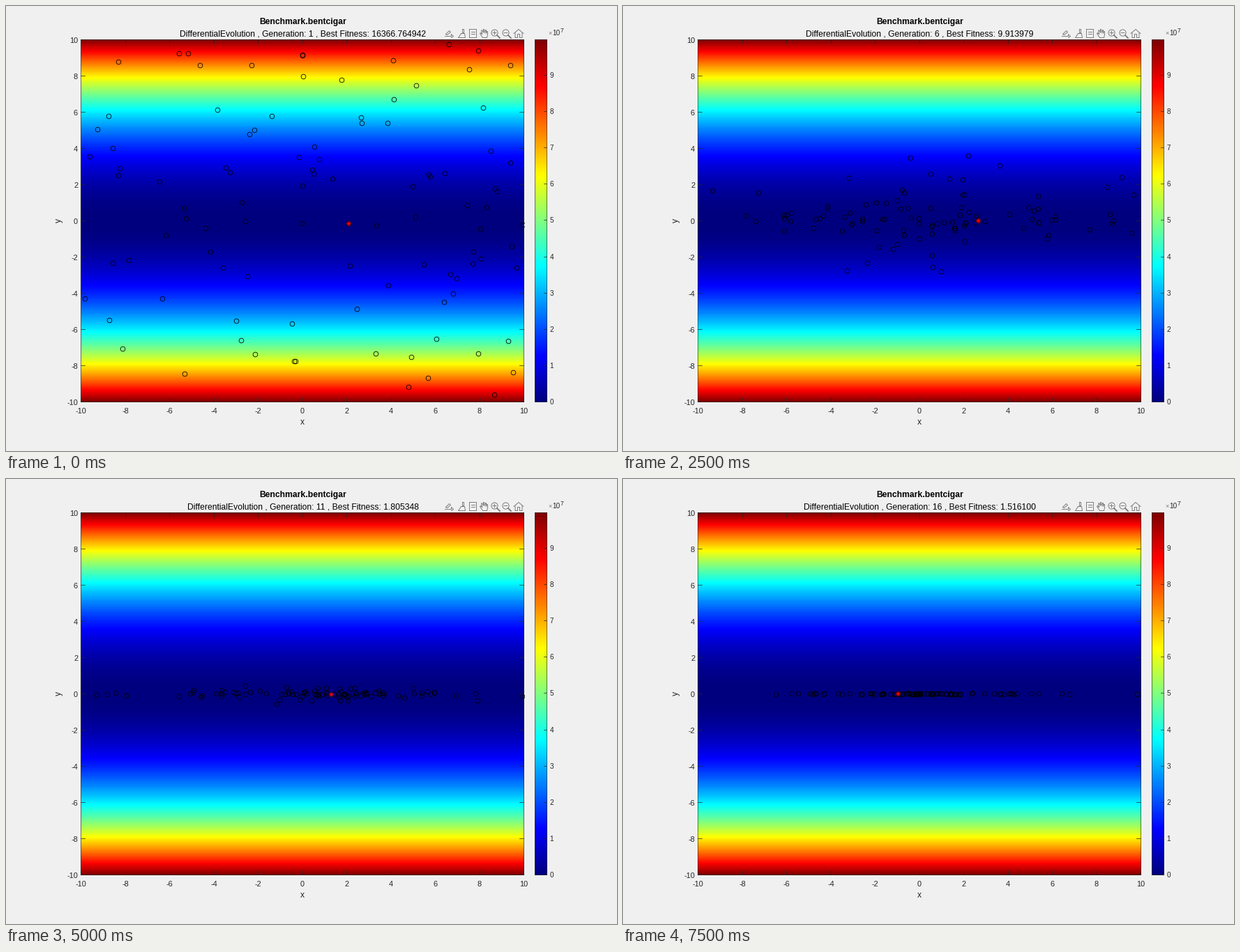
Animation of 876 by 639 pixels, one loop 8000 ms. Source, as a matplotlib script:

```python
import numpy as np
import matplotlib.pyplot as plt
from matplotlib.animation import FuncAnimation
from matplotlib.colors import ListedColormap
from matplotlib.patches import Circle, Rectangle

plt.rcParams["font.family"] = "Liberation Sans"

W, H, DPI = 876, 639, 96
PT = 72 / DPI  # points per pixel
GENS, STEP = 16, 500
LEFT, RIGHT, TOP, BOTTOM = 107.5, 742.5, 48.5, 568.5
BAR_L, BAR_R = 758.5, 775.5
INK, ICON = "#262626", "#747474"

# Differential evolution settings
MEMBERS, BOUND, SCALE, CROSS = 100, 10, .5, .6

# generation: x, y, fitness of each new best member
BEST = {1: (2.08, -.128, 16366.764942), 4: (-9.43, -.075, 5675.895718),
        5: (2.65, .002, 9.913979), 8: (1.3, 0, 1.805348), 15: (-.97, .001, 1.516100)}


def fitness(pop):
    return pop[:, 0] ** 2 + 1e6 * pop[:, 1] ** 2


def offspring(pop, rng):
    n = len(pop)
    a, b, c = (pop[rng.permutation(n)] for _ in range(3))
    mutant = a + SCALE * (b - c)
    outside = np.abs(mutant) > BOUND
    mutant[outside] = rng.uniform(-BOUND, BOUND, outside.sum())
    mask = rng.random(pop.shape) < CROSS
    mask[np.arange(n), rng.integers(0, 2, n)] = True  # at least one gene crosses
    return np.where(mask, mutant, pop)


def evolve():
    rng = np.random.default_rng(4)
    pop = rng.uniform(-BOUND, BOUND, (MEMBERS, 2))
    pops = []
    for gen in range(1, GENS + 1):
        if gen > 1:
            trial = offspring(pop, rng)
            better = fitness(trial) < fitness(pop)
            pop = np.where(better[:, None], trial, pop)
        if gen in BEST:
            pop[0] = BEST[gen][:2]
        pops.append(pop.copy())
    return pops


def px(x):
    return LEFT + (np.asarray(x) + BOUND) / (2 * BOUND) * (RIGHT - LEFT)


def py(y):
    return BOTTOM - (np.asarray(y) + BOUND) / (2 * BOUND) * (BOTTOM - TOP)


def crisp(v):
    return np.floor(v) + .5


def jet(n=256):
    v = np.linspace(0, 1, n)
    return ListedColormap(np.column_stack(
        [np.clip(1.5 - np.abs(4 * v - c), 0, 1) for c in (3, 2, 1)]))


fig = plt.figure(figsize=(W / DPI, H / DPI), dpi=DPI, facecolor="#f0f0f0")
ax = fig.add_axes([0, 0, 1, 1])
ax.axis("off")


def text(x, y, s, size=11, color=INK, ha="center", **kw):
    return ax.text(x, y, s, fontsize=size * PT, color=color, ha=ha, va="baseline", **kw)


def line(xs, ys, color=INK, width=.7):
    ax.plot(xs, ys, color=color, lw=width * PT, snap=False)


def shade(values, left, right):
    ax.imshow(values[:, None], extent=(left - .5, right + .5, BOTTOM + .5, TOP - .5),
              cmap=jet(), vmin=0, vmax=1, aspect="auto", interpolation="nearest")
    ax.add_patch(Rectangle((left, TOP), right - left, BOTTOM - TOP, fill=False,
                           ec=INK, lw=.6 * PT, snap=False))


def draw_axes():
    rows = int(BOTTOM - TOP) + 1
    shade(np.linspace(-1, 1, rows) ** 2, LEFT, RIGHT)
    shade(np.linspace(1, 0, rows), BAR_L, BAR_R)
    for t in range(-BOUND, BOUND + 1, 2):
        x, y = crisp(px(t)), crisp(py(t))
        for edge, inner in ((BOTTOM, BOTTOM - 6), (TOP, TOP + 6)):
            line([x, x], [edge, inner])
        for edge, inner in ((LEFT, LEFT + 6), (RIGHT, RIGHT - 6)):
            line([edge, inner], [y, y])
        text(px(t), 585, str(t))
        text(103, y + 4.3, str(t), ha="right")
    for k in range(10):
        y = crisp(BOTTOM - k * (BOTTOM - TOP) / 9.98)
        line([BAR_R - 4, BAR_R], [y, y])
        text(779.5, y + 3.8, str(k), 10, ha="left")
    text(777, 42, "×", 9, "#777777", ha="left")
    text(783.5, 42.5, "10", 10, ha="left")
    text(795, 37.5, "7", 8.5, ha="left")
    text(425, 601, "x", 12.1)
    ax.text(82, 308, "y", fontsize=12.1 * PT, color=INK, rotation=90,
            ha="right", va="center")
    text(425.3, 26, "Benchmark.bentcigar", 12.1, "black", weight="bold")


def draw_toolbar():
    def stroke(cx, *pts, width=.9):
        xs, ys = zip(*pts)
        line([cx + x for x in xs], [39.5 + y for y in ys], ICON, width)

    # export
    stroke(635.5, (-5, 1), (0, -4), (2, -2), (-3, 2), (-5, 1))
    stroke(635.5, (-6, 4), (3, 4), (3, 1), (6, 4), (3, 6))
    # brush
    stroke(653.5, (1, -6), (3, -6), (3, -1), (1, -1), (1, -6))
    stroke(653.5, (-1, 0), (4, 0), (5, 6), (-5, 6), (-1, 0))
    # data tip
    stroke(669.5, (-5, -6), (5, -6), (5, 6), (-5, 6), (-5, -6))
    for y in (-2, 1):
        stroke(669.5, (-2, y), (3, y))
    # hand
    stroke(685.5, (-3, 1), (-5, -1), (-6, 0), (-2, 6), (4, 6), (5, 2), (5, -3), (4, -3),
           (3, 0), (3, -5), (2, -5), (1, -1), (0, -6), (-1, -6), (-1, -1), (-3, -5),
           (-4, -4), (-3, 1))
    # magnifiers
    for cx in (701.5, 717.5):
        ax.add_patch(Circle((cx - 1, 38.5), 4.6, fill=False, ec=ICON, lw=.9 * PT))
        stroke(cx, (2.5, 2.5), (6.5, 6.5), width=1.7)
        stroke(cx, (-3.5, -1), (1.5, -1))
    stroke(700.5, (0, -3.5), (0, 1.5))
    # home
    stroke(735, (-7, 0), (0, -6), (7, 0))
    stroke(735, (-5, -1), (-5, 6), (-1.5, 6), (-1.5, 1), (1.5, 1), (1.5, 6), (5, 6), (5, -1))


draw_axes()
draw_toolbar()

frame = Rectangle((LEFT, TOP), RIGHT - LEFT, BOTTOM - TOP, transform=ax.transData)
caption = text(425.5, 43.2, "", 12.1, "black")
dots, = ax.plot([], [], "o", mfc="none", mec="black", ms=6.7 * PT, mew=.8 * PT,
                zorder=4, snap=False)
star, = ax.plot([], [], marker=(8, 2, 0), color="red", ms=6.7 * PT, mew=.55 * PT,
                zorder=5, snap=False)
for art in (dots, star):
    art.set_clip_path(frame)
ax.set_xlim(0, W)
ax.set_ylim(H, 0)

POPS = evolve()


def draw(i):
    gen = i + 1
    x, y, fit = BEST[max(g for g in BEST if g <= gen)]
    dots.set_data(px(POPS[i][:, 0]), py(POPS[i][:, 1]))
    star.set_data([px(x)], [py(y)])
    caption.set_text(f"DifferentialEvolution , Generation: {gen} , Best Fitness: {fit:.6f}")
    return dots, star, caption


anim = FuncAnimation(fig, draw, frames=GENS, interval=STEP, repeat=True, repeat_delay=0)
plt.show()
```
